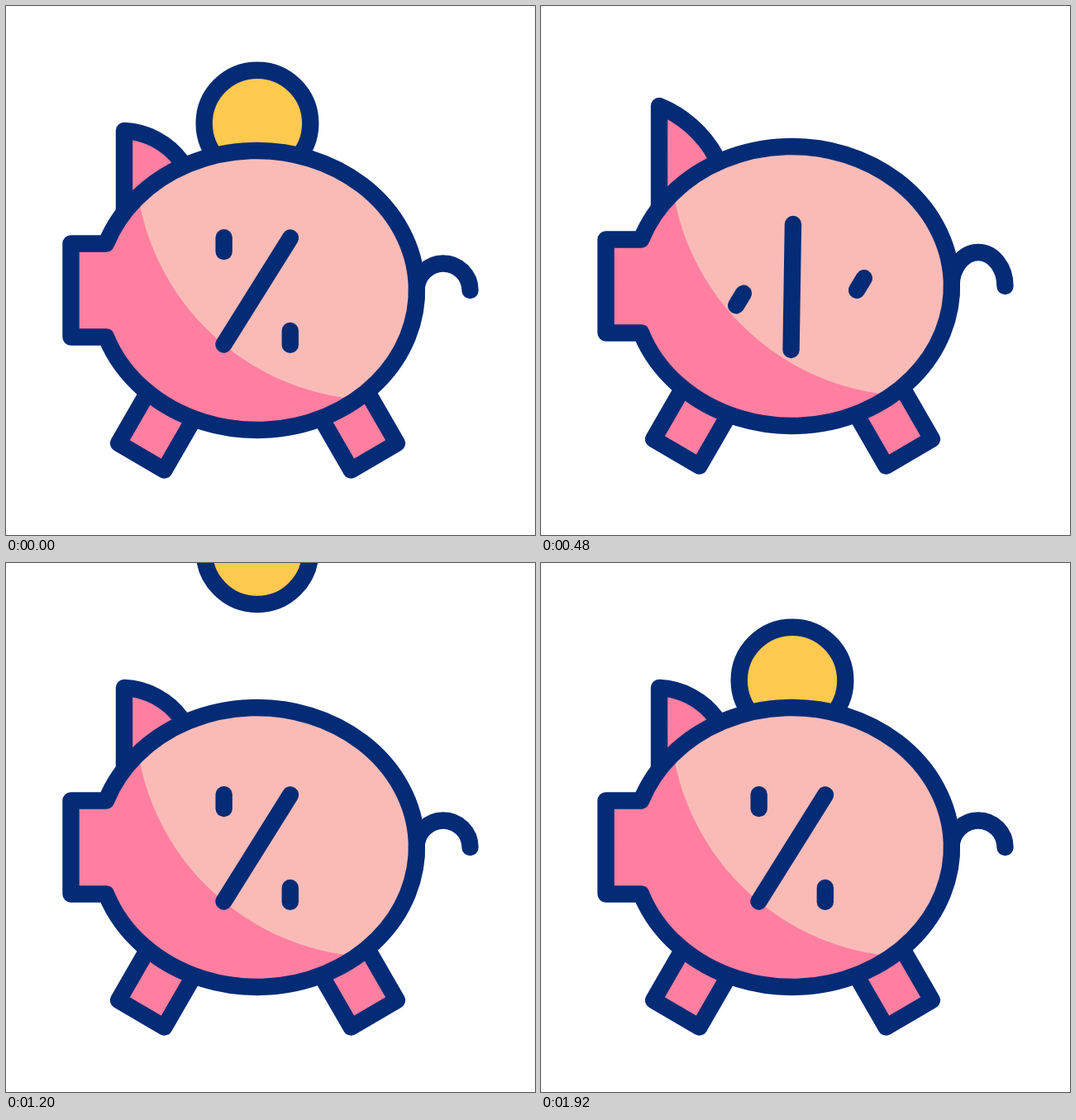
Animation of 640 by 640 pixels, one loop 2 s. Source, as an HTML page with a canvas:

```html
<!DOCTYPE html>
<html lang="en">
<head>
<meta charset="utf-8">
<title>Piggy bank</title>
<style>
  html, body { margin: 0; width: 100%; height: 100%; overflow: hidden; background: #fff; }
  canvas { display: block; width: 100vmin; height: 100vmin; }
</style>
</head>
<body>
<canvas id="stage" width="640" height="640"></canvas>
<script>
const ctx = document.getElementById('stage').getContext('2d');
const NAVY = '#042b76', PINK = '#ff7fa1', PALE = '#fabbb7', GOLD = '#fdc94f';
const LOOP = 2000, STEP = 40, LAST = 1920;
const RAD = Math.PI / 180;

// Smooth curve through [time, value] knots, flat at turning points and ends.
function track(...k) {
  const n = k.length;
  const chord = i => (k[i + 1][1] - k[i][1]) / (k[i + 1][0] - k[i][0]);
  const slope = i => {
    if (i === 0 || i === n - 1) return 0;
    const a = chord(i - 1), b = chord(i);
    return a * b <= 0 ? 0 : 2 * a * b / (a + b);
  };
  return t => {
    if (t <= k[0][0]) return k[0][1];
    if (t >= k[n - 1][0]) return k[n - 1][1];
    let i = 0;
    while (t > k[i + 1][0]) i++;
    const h = k[i + 1][0] - k[i][0], u = (t - k[i][0]) / h, v = 1 - u;
    return k[i][1] * (1 + 2 * u) * v * v + k[i + 1][1] * u * u * (3 - 2 * u)
      + h * u * v * (slope(i) * v - slope(i + 1) * u);
  };
}

const lift = track([240, 0], [480, -5], [880, 2], [1160, 0]);
const stretch = track([220, 0], [480, 1], [880, 0.62], [1160, 0]);
const legSwing = track([480, 0], [880, 1], [1160, 0]);
const spin = track([220, 0], [480, 148.9], [880, 380.4], [1160, 360]);
const dots = [
  { base: -125.4,
    turn: track([220, 0], [480, 123], [880, 391.9], [1160, 360]),
    radius: track([220, 69.2], [480, 82.8], [880, 78.6], [1160, 69.2]) },
  { base: 54.6,
    turn: track([220, 0], [480, 112], [880, 384.8], [1160, 360]),
    radius: track([220, 69.2], [480, 65], [880, 66.6], [1160, 69.2]) }
];
const coinDrop = track([0, 142], [200, 180.5], [360, 300]);
const coinReturn = track([1000, -82], [1600, 179], [1920, 142]);

function paint(path, fill) {
  ctx.beginPath();
  path();
  if (fill) {
    ctx.fillStyle = fill;
    ctx.fill();
  }
  ctx.stroke();
}

function bar(x, y, half, deg) {
  const dx = half * Math.cos(deg * RAD), dy = half * Math.sin(deg * RAD);
  paint(() => {
    ctx.moveTo(x - dx, y - dy);
    ctx.lineTo(x + dx, y + dy);
  });
}

function leg(flip, deg) {
  ctx.save();
  if (flip) {
    ctx.translate(609, 0);
    ctx.scale(-1, 1);
  }
  ctx.translate(202, 479);
  ctx.rotate(-deg * RAD);
  ctx.translate(-202, -479);
  paint(() => {
    ctx.moveTo(181, 451);
    ctx.lineTo(136, 529);
    ctx.lineTo(191.5, 561.5);
    ctx.lineTo(236.5, 483.5);
  }, PINK);
  ctx.restore();
}

function ear(e) {
  const tip = 151 - 25 * e;
  paint(() => {
    ctx.moveTo(143, 250);
    ctx.lineTo(143, tip);
    ctx.bezierCurveTo(170, tip + 1 + 10 * e, 196, 166 - 8 * e, 212, 188);
    ctx.lineTo(212, 250);
  }, PINK);
}

function tail(e) {
  paint(() => ctx.ellipse(529, 344, 32.5, 32.5 + 8.5 * e, 0, Math.PI, 2 * Math.PI));
}

function bodyPath() {
  const a = Math.asin(56.5 / 169);
  ctx.beginPath();
  ctx.ellipse(303.5, 344, 193.5, 169, 0, Math.PI + a, 3 * Math.PI - a);
  ctx.lineTo(78.5, 400.5);
  ctx.lineTo(78.5, 287.5);
  ctx.closePath();
}

function body() {
  ctx.save();
  bodyPath();
  ctx.fillStyle = PINK;
  ctx.fill();
  ctx.clip();
  ctx.beginPath();
  ctx.arc(451, 182, 295, 0, 2 * Math.PI);
  ctx.fillStyle = PALE;
  ctx.fill();
  ctx.restore();
  bodyPath();
  ctx.stroke();
}

function percent(t) {
  const x = 303.75, y = 345, turn = spin(t);
  bar(x, y, 76, turn - 58);
  for (const d of dots) {
    const a = (d.base + d.turn(t)) * RAD, r = d.radius(t);
    bar(x + r * Math.cos(a), y + r * Math.sin(a), 8.5, 90 - turn);
  }
}

function draw(t) {
  ctx.fillStyle = '#fff';
  ctx.fillRect(0, 0, 640, 640);
  ctx.strokeStyle = NAVY;
  ctx.lineWidth = 20.4;
  ctx.lineCap = ctx.lineJoin = 'round';

  const coinY = t < 700 ? coinDrop(t) : coinReturn(t);
  paint(() => ctx.arc(304, coinY, 64.3, 0, 2 * Math.PI), GOLD);

  ctx.save();
  ctx.translate(0, lift(t));
  const e = stretch(t), swing = legSwing(t);
  leg(false, 7.9 * swing);
  leg(true, 10 * swing);
  ear(e);
  tail(e);
  body();
  percent(t);
  ctx.restore();
}

function tick() {
  const t = performance.now() % LOOP;
  draw(Math.min(LAST, Math.floor(t / STEP) * STEP));
  requestAnimationFrame(tick);
}
tick();
</script>
</body>
</html>
```
